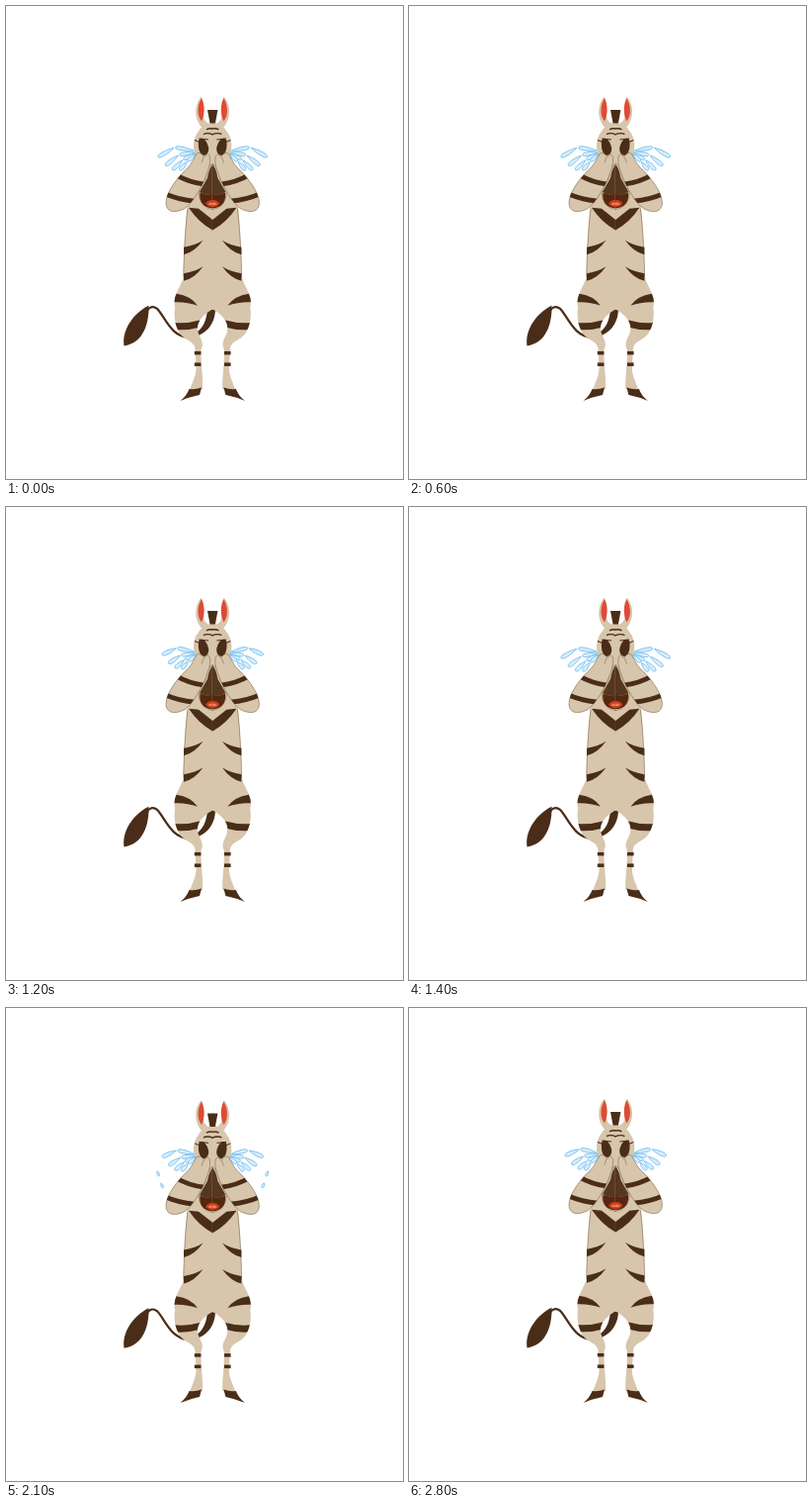
Animation, 402 px wide and 478 px high, one loop 2900 ms. Source, as an HTML page with a canvas:

```html
<!DOCTYPE html>
<html lang="en">
<head>
<meta charset="utf-8">
<title>Crying zebra</title>
<style>
html, body { margin: 0; width: 100%; height: 100%; overflow: hidden; background: #fff; }
canvas { display: block; width: 402px; height: 478px; }
</style>
</head>
<body>
<canvas id="stage" width="402" height="478"></canvas>
<script>
const ctx = document.getElementById('stage').getContext('2d');
const LOOP = 2900, STEP = 100, FLOOR = 398, AXIS = 209.2;
const HIDE = '#d7c6ac', DARK = '#4a2d18', LINE = '#806b50', RED = '#df4a35';

function shape(d, fill, stroke, width = 0.6) {
  const path = new Path2D(d);
  if (fill) { ctx.fillStyle = fill; ctx.fill(path); }
  if (stroke) { ctx.strokeStyle = stroke; ctx.lineWidth = width; ctx.stroke(path); }
}

// Draws the left half, then its reflection.
function both(draw) {
  draw();
  ctx.save();
  ctx.translate(2 * AXIS, 0);
  ctx.scale(-1, 1);
  draw();
  ctx.restore();
}

// Bands are stroked wide and trimmed to the limb.
function banded(outline, bands, width, edge) {
  shape(outline, HIDE, edge);
  ctx.save();
  ctx.clip(new Path2D(outline));
  shape(bands, null, DARK, width);
  ctx.restore();
}

function tail() {
  shape('M204 306H212C212 322 202 335 182 336L181 333.5C196 333 203 322 204 306Z', DARK);
  shape('M141 313C143 305 148 302 153 306C161 314 167 335 186 335', null, DARK, 2.2);
  shape('M144.5 303C145 321 139 341 119.5 343.5C117 329 128 311 144.5 303Z', DARK);
}

function leg() {
  banded('M172 300C169 313 171 323 176 331C181 338 190 338 191.5 346L192.5 367C192 375 188 382 186 388L199 387C200 377 197 361 197.5 347C201 341 197 336 195 331C191 320 200 312 209.5 306.5V296Z',
    'M170 323.5Q183 325 197 321', 7);
  for (const y of [349, 360.5]) shape(`M190.8 ${y}h6.6v3.5h-6.6Z`, DARK);
  shape('M185.5 387Q192 388 198 385.5L196 393Q186 395 176.5 399Q183 394 185.5 387Z', DARK);
}

function torso() {
  shape('M193 182L184 200C181 222 180 258 179.5 274C178 283 170 289 170.5 303C177 313 195 307 209.5 307V182Z', HIDE);
  shape('M184 205C181.5 225 180 255 179.8 274', null, LINE);
  for (const tip of [237, 263.5]) {
    shape(`M199.5 ${tip}Q191 ${tip + 12} 180 ${tip + 14.5}V${tip + 7}Q192 ${tip + 5} 199.5 ${tip}Z`, DARK);
  }
  shape('M172.5 291Q187 293 194 303Q183 299 170.5 299.5Q170.5 295 172.5 291Z', DARK);
  shape('M185 204L195 205L209.5 216.5V227Q195 219 185 204Z', DARK);
}

function head() {
  shape('M198 92C192 98 189 112 198 123L206 120C202 117 200 116 200 110Z', HIDE);
  shape('M198 93.5C193.5 101 193 111 198 117C201.5 110 201.5 100 198 93.5Z', RED);
  shape('M209.5 118.5C203 118 198 122 195 127C191 132 189 139 190.5 147C191 158 196 173 196 194H209.5Z', HIDE);
  shape('M209.5 105.5H204L206.5 119H209.5Z', DARK);
  shape('M203 125.3Q206 123.5 210 124.5M200 130Q204 128 210 130.5', null, DARK, 1.4);
  shape('M195.5 135C200 132 203.5 137 205 143C206 148 203 151.5 200 151.5C195 150 194 141 195.5 135Z', DARK);
  shape('M191 136L197 138.5M195.5 134.5L205 135.5', null, DARK, 1);
}

function muzzle() {
  shape('M209.5 160Q204 161 202 174L195 187Q195 204 209.5 206Z', HIDE, LINE);
  shape('M209.5 161Q206 163 204 174L196 188Q203 193 209.5 190Z', '#55371f');
  shape('M209.5 190Q202 192 196.5 188.5C195 198 200 204.5 209.5 204.5Z', '#55270f');
  shape('M209.5 196.5Q205 195.5 202 200Q205 203.5 209.5 203.5Z', '#cf3b1c');
  shape('M209.5 199Q206.5 198 204.5 200.5Q206 202 209.5 201.5Z', '#ec8058');
}

function arm() {
  banded('M194 149C190 153 189 159 184 164C175 172 162 188 162 199C162 209 171 210 181 205C189 200 201 179 204 168Q208 158 206 152Q204 148 201 153Q197 148 194 149Z',
    'M172 171Q186 179 201 180.5M160 189.5Q174 196 191 197.5', 4.8, LINE);
  shape('M200 153L198 159', null, LINE);
}

function streak(x, y, tipX, tipY, breadth) {
  const length = Math.hypot(tipX - x, tipY - y);
  ctx.save();
  ctx.translate(x, y);
  ctx.rotate(Math.atan2(tipY - y, tipX - x));
  shape(`M0 0C${length / 2} ${-breadth} ${length} ${-breadth} ${length} 0S${length / 2} ${breadth} 0 0Z`,
    '#d7edfb', '#70bdf0', 0.8);
  ctx.restore();
}

// Four jets arc out of the eye; each breaks into two streaks.
function tears(reach, dripping) {
  for (let jet = 0; jet < 4; jet++) {
    const t = jet / 3, slope = 1.3 * t - 0.7, span = reach * (1 - 0.55 * t);
    const point = part => {
      const r = span * part;
      return [194 - r, 149 + slope * r + 0.02 * r * r];
    };
    streak(...point(0.1), ...point(0.56), 2.4);
    streak(...point(0.6), ...point(1), 2.6);
  }
  if (dripping) {
    for (let i = 0; i < 2; i++) streak(153 + 4 * i, 164 + 12 * i, 155 + 4 * i, 169 + 12 * i, 1.6);
  }
}

function draw(time) {
  const tick = Math.floor((time % LOOP) / STEP);
  const phase = tick ? tick % 4 : 2; // the loop opens mid-sob
  const top = 91.5 + 1.5 * Math.sin(phase * Math.PI / 2);
  ctx.fillStyle = '#fff';
  ctx.fillRect(0, 0, 402, 478);
  ctx.save();
  ctx.translate(0, FLOOR);
  ctx.scale(1, (FLOOR - top) / (FLOOR - 92));
  ctx.translate(0, -FLOOR);
  tail();
  [leg, torso, head, muzzle].forEach(both);
  both(() => tears(phase === 2 ? 40 : 36, phase === 1));
  both(arm);
  ctx.restore();
}

let start;
function loop(now) {
  start ??= now;
  draw(now - start);
  requestAnimationFrame(loop);
}
draw(0);
requestAnimationFrame(loop);
</script>
</body>
</html>
```
